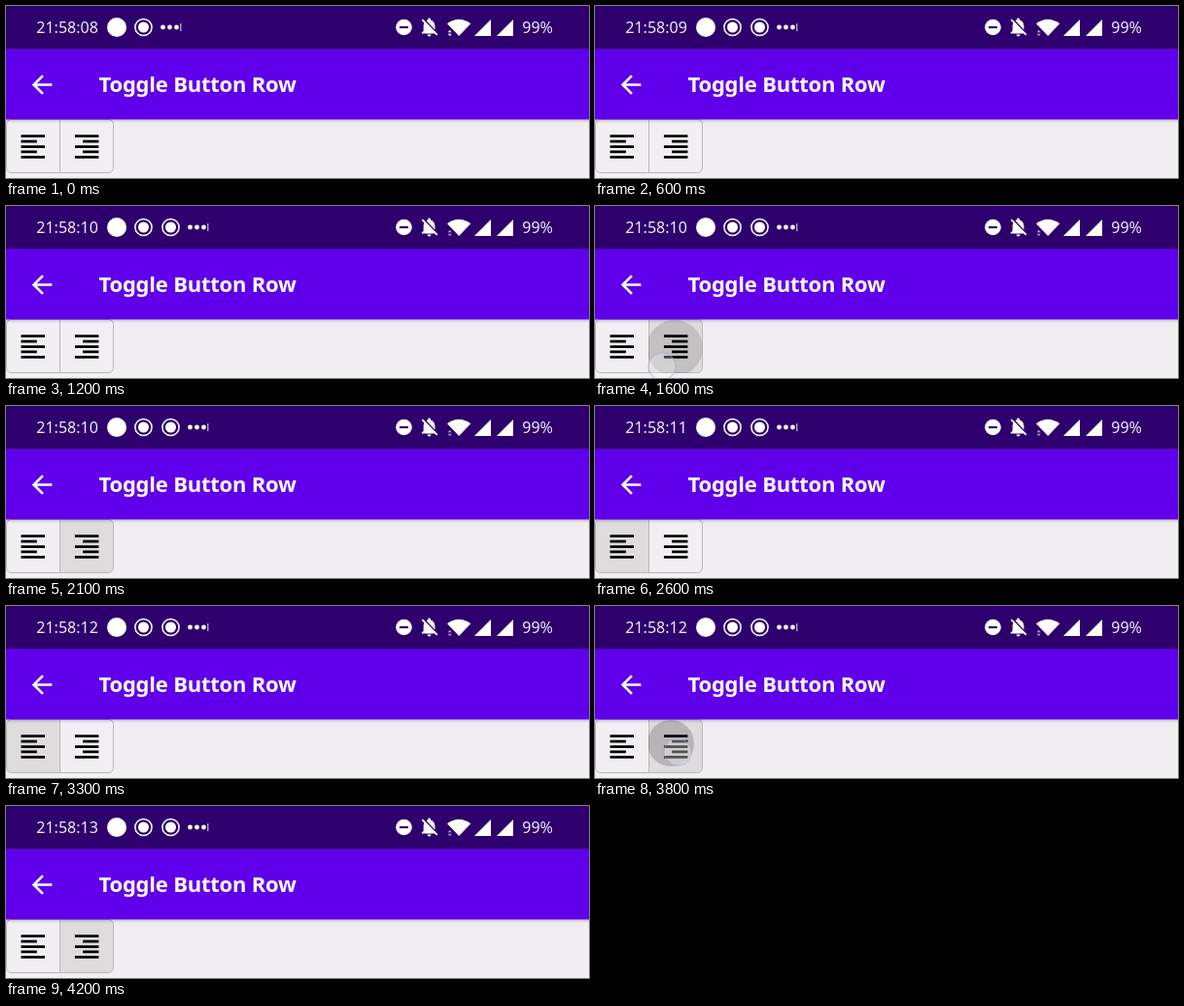
These frames come from a looping animation (600x178 px, 4.8 s). An HTML page:

```html
<!DOCTYPE html>
<html lang="en">
<head>
<meta charset="utf-8">
<title>Toggle Button Row</title>
<style>
  html, body { margin: 0; width: 100%; height: 100%; overflow: hidden; background: #f1eff2; }
  svg { display: block; width: 600px; height: 178px; }
  text { font-family: "Noto Sans", "Open Sans", sans-serif; }
  .status { font-size: 16px; fill: #f0eaf6; }
  .title { font-size: 22px; font-weight: 600; letter-spacing: -.21px; fill: #fff; }
</style>
</head>
<body>
<svg viewBox="0 0 600 178">
  <defs>
    <linearGradient id="shade" x1="0" y1="0" x2="0" y2="1">
      <stop offset="0" stop-color="#000" stop-opacity=".16"/>
      <stop offset="1" stop-color="#000" stop-opacity="0"/>
    </linearGradient>
    <clipPath id="row"><rect x=".5" y="117.5" width="110" height="55" rx="5"/></clipPath>
    <clipPath id="cell0"><rect x="0" y="117" width="55.5" height="56"/></clipPath>
    <clipPath id="cell1"><rect x="55" y="117" width="56" height="56"/></clipPath>
    <g id="record">
      <circle r="8.6" fill="none" stroke="#fff" stroke-width="1.5"/>
      <circle r="5.5" fill="#fff"/>
    </g>
    <path id="lines" d="M3 3H21V5H3zM3 7H15V9H3zM3 11H21V13H3zM3 15H15V17H3zM3 19H21V21H3z"/>
    <path id="signal" d="M0 17H17V0z"/>
  </defs>

  <rect width="600" height="178" fill="#f1eff2"/>

  <!-- button row -->
  <g clip-path="url(#row)">
    <rect class="fill" x="0" y="117" width="55.5" height="56" fill="#dfdcde"/>
    <rect class="fill" x="55.5" y="117" width="55.5" height="56" fill="#dfdcde"/>
  </g>
  <rect x=".5" y="117.5" width="110" height="55" rx="5" fill="none" stroke="#b9b7ba"/>
  <path d="M55.5 118V172" stroke="#b9b7ba"/>
  <use href="#lines" transform="translate(11.4 129.2) scale(1.36)"/>
  <use href="#lines" transform="translate(99.5 129.2) scale(-1.36 1.36)"/>
  <g id="rippleClip"><circle id="ripple" fill="#000"/></g>
  <g id="touch">
    <circle r="14" fill="#fff" fill-opacity=".4" stroke="#b4a8d4" stroke-opacity=".7" stroke-width="1.5"/>
  </g>

  <!-- app bar -->
  <rect y="117.5" width="600" height="4" fill="url(#shade)"/>
  <rect y="44" width="600" height="73.5" fill="#6000ea"/>
  <path transform="translate(21.3 65.9) scale(1.3)" fill="#fff"
    d="M20 11V13H8L13.5 18.5 12.08 19.92 4.16 12 12.08 4.08 13.5 5.5 8 11z"/>
  <text class="title" x="95.5" y="89">Toggle Button Row</text>

  <!-- status bar -->
  <rect width="600" height="44.4" fill="#2d006d"/>
  <text id="clock" class="status" x="31.3" y="28"></text>
  <circle cx="114" cy="22" r="10" fill="#fff"/>
  <use href="#record" x="141.5" y="22"/>
  <g id="extra"><use href="#record"/></g>
  <g id="more" fill="#fff">
    <circle cx="-7" r="2.4"/><circle r="2.4"/><circle cx="7" r="2.4"/>
    <path d="M11.3 -4V4" stroke="#cdbfdd" stroke-width="1.2"/>
  </g>
  <circle cx="409.5" cy="22" r="8.3" fill="#fff"/>
  <path d="M405 22H414" stroke="#2d006d" stroke-width="2.2"/>
  <g transform="translate(423.8 10) scale(.98)" fill="#fff">
    <path d="M20 18.7L5.3 3.5 4 4.8 6.8 7.6Q6 9.1 6 11V16L4 18V19H17.7L19.7 21 21 19.7z"/>
    <path d="M10 20H14A2 2 0 0 1 10 20zM18 14.7V11Q17.7 5.9 13.5 4.7V4A1.5 1.5 0 0 0 10.5 4V4.7L9 5.3z"/>
  </g>
  <path d="M454 18.3Q466 9.3 478.3 18.3L466.2 31z" fill="#fff"/>
  <path id="traffic" d="M454.7 27.3L456.7 24.8 458.7 27.3zM454.7 28.7H458.7L456.7 31.2z" fill="#fff"/>
  <use href="#signal" x="482" y="14" fill="#fff"/>
  <use href="#signal" x="505" y="14" fill="#fff"/>
  <text class="status" x="531.3" y="28">99%</text>
</svg>
<script>
  const LOOP = 4800, STEP = 100, RIPPLE = 240;
  const ticks = [300, 1200, 2300, 3300, 4200];
  const taps = [
    { at: 1400, cell: 1, center: [82, 147], touch: [69, 166] },
    { at: 2320, cell: 0, center: [28, 145], touch: [19, 156] },
    { at: 3650, cell: 1, center: [78, 142], touch: [85, 151] }
  ];
  const $ = id => document.getElementById(id);
  const fills = document.querySelectorAll(".fill");
  const set = (el, attrs) => {
    for (const name in attrs) el.setAttribute(name, attrs[name]);
  };

  function drawStatus(t) {
    const seconds = 8 + ticks.filter(at => t >= at).length;
    $("clock").textContent = "21:58:" + String(seconds).padStart(2, "0");

    const p = Math.min(1, t / 600);
    const ease = p * p * (3 - 2 * p);
    set($("extra"), { transform: `translate(169.5 22) scale(${ease})`, opacity: ease });
    set($("more"), { transform: `translate(${168.5 + 28 * ease} 22)` });

    const busy = t < 300 || [2000, 3000, 4000].includes(t);
    set($("traffic"), { opacity: busy ? 0.95 : 0.6 });
  }

  function drawButtons(t) {
    const tap = taps.filter(x => t >= x.at + STEP / 2).pop();
    fills.forEach((el, i) => set(el, { opacity: tap && tap.cell === i ? 1 : 0 }));

    const age = tap ? t - tap.at : RIPPLE;
    const live = age < RIPPLE;
    set($("ripple"), { opacity: live ? 0.33 - 0.001 * age : 0 });
    set($("touch"), { opacity: live ? Math.min(1, 1.25 - age * 0.003) : 0 });
    if (!live) return;

    const [cx, cy] = tap.center;
    set($("ripple"), { cx, cy, r: 9 + 0.1 * age });
    set($("rippleClip"), { "clip-path": `url(#cell${tap.cell})` });
    set($("touch"), { transform: `translate(${tap.touch})` });
  }

  const start = performance.now();
  function frame() {
    const elapsed = (performance.now() - start) % LOOP;
    const t = Math.floor(elapsed / STEP) * STEP;
    drawStatus(t);
    drawButtons(t);
    requestAnimationFrame(frame);
  }
  frame();
</script>
</body>
</html>
```
